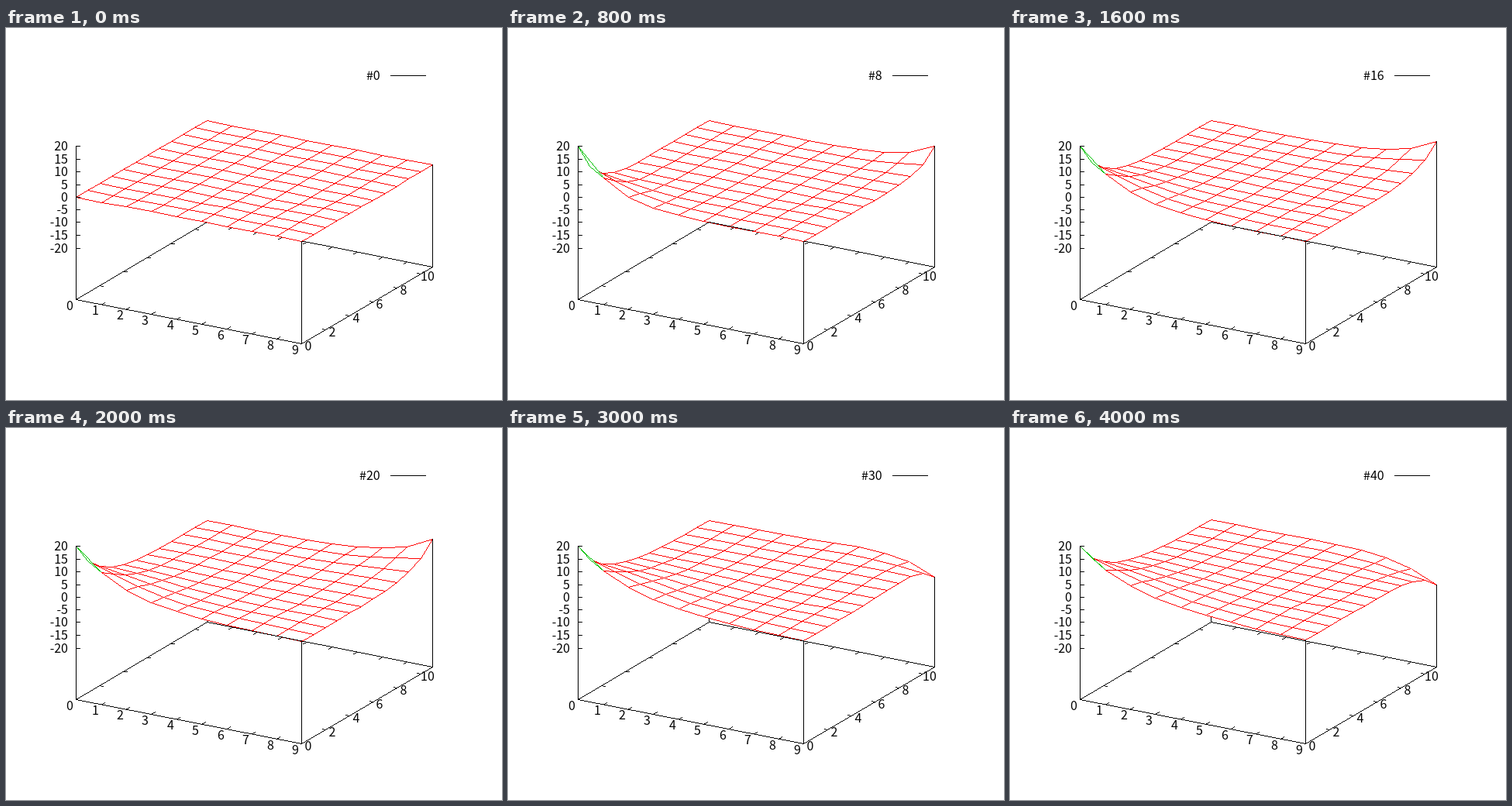
Recreate the animation shown at these times as an HTML page with a canvas. Size 640 by 480 pixels, loop 4100 ms.

```html
<!DOCTYPE html>
<html lang="en">
<head>
<meta charset="utf-8">
<title>Heat surface</title>
<style>
  html, body { margin: 0; width: 640px; height: 480px; overflow: hidden; background: #fff; }
  canvas, svg { position: absolute; left: 0; top: 0; display: block; }
  text { font: 300 16px "Noto Sans CJK JP", "Noto Sans CJK SC", sans-serif; fill: #000; }
</style>
</head>
<body>
<canvas id="plot" width="640" height="480"></canvas>
<svg id="labels" width="640" height="480"></svg>
<script>
const W = 640, H = 480, NX = 10, NY = 12;
const STEPS = 41, STEP_MS = 100;
const HOT = 20, FLUX = 2.5, FLIP = 20;
// Pixels as ABGR
const WHITE = 0xffffffff, BLACK = 0xff000000, RED = 0xff0000ff, GREEN = 0xff00c000;

const ctx = document.getElementById('plot').getContext('2d');
const image = ctx.createImageData(W, H);
const pixels = new Uint32Array(image.data.buffer);

// --- Heat diffusion with insulated edges ---
const clamp = (v, max) => Math.max(0, Math.min(max, v));
const at = (u, x, y) => u[clamp(y, NY - 1) * NX + clamp(x, NX - 1)];

function advance(u, step) {
  const next = u.map((_, i) => {
    const x = i % NX, y = Math.floor(i / NX);
    return (at(u, x - 1, y) + at(u, x + 1, y) + at(u, x, y - 1) + at(u, x, y + 1)) / 4;
  });
  next[0] = HOT;
  next[NX * NY - 1] += step <= FLIP ? FLUX : -FLUX;
  return next;
}

const states = [new Float64Array(NX * NY)];
for (let s = 1; s < STEPS; s++) states.push(advance(states[s - 1], s));

// --- Orthographic view: tilted 60 degrees, turned 30 degrees ---
const CX = 320, CY = 230, SCALE_X = 168.7, SCALE_Y = 114.6;
const BASE = -40, SIN = 0.5, COS = Math.sqrt(3) / 2;

function project(x, y, z) {
  const u = x / 4.5 - 1, v = y / 5.5 - 1, w = (z + 10) / 30;
  return [
    CX + SCALE_X * (COS * u + SIN * v),
    CY + SCALE_Y * (SIN * (SIN * u - COS * v) - COS * w)
  ];
}

// Pixels are truncated towards the centre of the view
const snap = ([x, y]) => [CX + Math.trunc(x - CX), CY + Math.trunc(y - CY)];

function line(p, q, color, fromX = 0, toX = W) {
  const [x0, y0] = snap(p), [x1, y1] = snap(q);
  const n = Math.max(Math.abs(x1 - x0), Math.abs(y1 - y0), 1);
  for (let i = 0; i <= n; i++) {
    const x = Math.round(x0 + (x1 - x0) * i / n);
    const y = Math.round(y0 + (y1 - y0) * i / n);
    if (x >= fromX && x <= toX) pixels[y * W + x] = color;
  }
}

const cross = (a, b, x, y) => (b[0] - a[0]) * (y - a[1]) - (b[1] - a[1]) * (x - a[0]);

function fill(...corners) {
  const [a, b, c] = corners.map(snap);
  const xs = [a[0], b[0], c[0]], ys = [a[1], b[1], c[1]];
  const sign = Math.sign(cross(a, b, c[0], c[1]));
  for (let y = Math.min(...ys); y <= Math.max(...ys); y++) {
    for (let x = Math.min(...xs); x <= Math.max(...xs); x++) {
      if (sign * cross(a, b, x, y) > 0 && sign * cross(b, c, x, y) > 0 && sign * cross(c, a, x, y) > 0) {
        pixels[y * W + x] = WHITE;
      }
    }
  }
}

// Upper side is red, underside green
const side = (a, b, c) => cross(a, b, c[0], c[1]) > 0 ? GREEN : RED;

function drawCell(a, b, c, d) {
  const far = side(b, c, d), near = side(a, b, d);
  fill(b, c, d);
  line(b, d, WHITE);
  line(b, c, far);
  line(d, c, far);
  fill(a, b, d);
  line(a, b, near);
  line(a, d, near);
  if (far !== near) line(d, b, GREEN);
}

const floor = (x, y) => project(x, y, BASE);

function drawTicks() {
  for (let x = 1; x < 9; x++) {
    line(floor(x, 0), floor(x, 0.28), BLACK);
    line(floor(x, 11), floor(x, 10.72), BLACK);
  }
  for (let y = 2; y <= 10; y += 2) {
    line(floor(0, y), floor(0.13, y), BLACK);
    line(floor(9, y), floor(8.87, y), BLACK);
  }
}

function drawPlot(u) {
  const point = (x, y) => project(x, y, at(u, x, y));
  const back = floor(0, 11), corner = floor(9, 11), front = floor(9, 0), origin = floor(0, 0);
  pixels.fill(WHITE);
  line(back, corner, BLACK);
  line(back, point(0, 11), BLACK);
  line(origin, back, BLACK);
  drawTicks();

  for (let y = NY - 2; y >= 0; y--) {
    for (let x = 0; x < NX - 1; x++) {
      drawCell(point(x, y), point(x + 1, y), point(x + 1, y + 1), point(x, y + 1));
    }
  }

  // The rear floor edge shows wherever the front rim has lifted off it
  let lifted = 0;
  while (lifted < 9 && at(u, lifted, 0) > 0.01) lifted++;
  line(back, corner, BLACK, 0, project(lifted, 0, 0)[0]);
  line(back, corner, BLACK, front[0]);

  line(origin, front, BLACK);
  line(front, corner, BLACK);
  line(front, point(9, 0), BLACK);
  line(corner, point(9, 11), BLACK);
  line(origin, project(0, 0, 20), BLACK);
  for (let z = -20; z <= 20; z += 5) {
    const [x, y] = project(0, 0, z);
    line([x, y], [x + 5, y], BLACK);
  }
  line([496, 61], [541, 61], BLACK);
  ctx.putImageData(image, 0, 0);
}

// --- Labels, centred vertically on the given point ---
const svg = document.getElementById('labels');
function label(text, [x, y], dx, dy, anchor = 'middle') {
  const el = document.createElementNS('http://www.w3.org/2000/svg', 'text');
  el.setAttribute('x', x + dx);
  el.setAttribute('y', y + dy + 6);
  el.setAttribute('text-anchor', anchor);
  el.textContent = text;
  svg.append(el);
  return el;
}
for (let x = 0; x <= 9; x++) label(x, snap(floor(x, 0)), -7.5, 8);
for (let y = 0; y <= 10; y += 2) label(y, snap(floor(9, y)), 9, 3);
for (let z = -20; z <= 20; z += 5) label(z, snap(project(0, 0, z)), -10, 0, 'end');
const title = label('#0', [482, 61], 0.7, 0, 'end');

let shown = -1;
const start = performance.now();
function tick(now) {
  const step = Math.floor(Math.max(0, now - start) / STEP_MS) % STEPS;
  if (step !== shown) {
    shown = step;
    drawPlot(states[step]);
    title.textContent = '#' + step;
  }
  requestAnimationFrame(tick);
}
tick(start);
</script>
</body>
</html>
```
